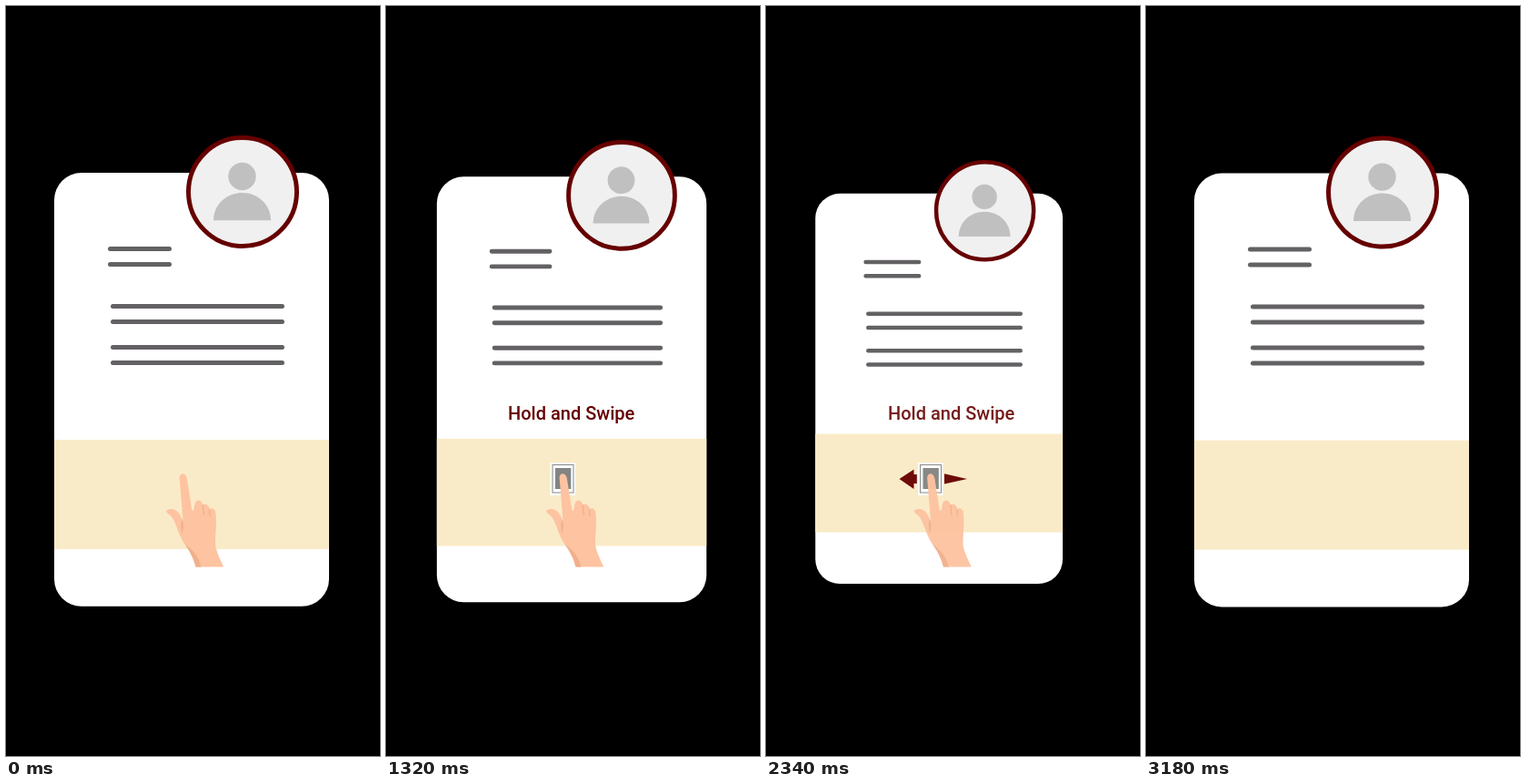
These frames come from a looping animation (411 px wide and 823 px high, 3.63 s). An HTML page:

```html
<!DOCTYPE html>
<html lang="en">
<head>
<meta charset="utf-8">
<title>Hold and swipe</title>
<style>
  html, body { margin: 0; width: 100%; height: 100%; overflow: hidden; background: #000; }
  svg { display: block; width: 100%; height: 100%; }
  text { font: 500 20px Roboto, sans-serif; fill: #660000; }
</style>
</head>
<body>
<svg viewBox="0 0 411 823">
  <defs>
    <g id="card">
      <rect x="53" y="183" width="302" height="475.8" rx="30" fill="#fff"/>
      <rect x="53" y="476" width="302" height="120" fill="#faebc8"/>
      <path d="M114.5 266.5h65M114.5 283.5h65M117.5 329.5h186M117.5 346.5h186M117.5 374.5h186M117.5 391.5h186"
            stroke="#636164" stroke-width="5" stroke-linecap="round"/>
      <circle cx="260" cy="204" r="59.5" fill="#f0f0f0" stroke="#660000" stroke-width="5"/>
      <g fill="#c0c0c0">
        <circle cx="259.5" cy="187" r="15.2"/>
        <path d="M228 235.3C228 218 242 205 259.5 205S291 218 291 235.3Z"/>
      </g>
    </g>
  </defs>

  <use id="current" href="#card"/>
  <use id="next" href="#card"/>
  <text id="label" x="134" y="453.6">Hold and Swipe</text>

  <g id="gesture">
    <path id="arrows" fill="#660000" d="M160 519L176 508.5V514H179.3V524H176V530ZM209.5 513.3L234.5 519L209.5 524.5Z"/>
    <g id="button">
      <rect x="180.5" y="501" width="27.5" height="36" fill="#fff"/>
      <rect x="183" y="503.5" width="23" height="30.5" fill="none" stroke="#858886"/>
      <rect x="186" y="507" width="17.3" height="23" fill="#828583"/>
    </g>
    <g id="hand">
      <path fill="#fec3a0" d="M190.7 519C190 511.5 197.5 511.5 198.8 518L204.3 553C206 555 206.5 553 207 549
        C208 540 215 541 216.5 548C218 545.5 223 546.5 224 552.5C226 550 230 551.5 230.3 556
        C232 566 230 577 230 590C230.5 597 234 604 239.2 615.5H208.5C206 605 201 597 196.5 590.5
        C190 582 188 570 182.5 561C180 558 176.5 557 176 554C180 551 186 551.5 189.5 556
        C192 559 193 562 194.5 565Z"/>
      <path fill="#f1b08c" d="M196.5 590.5C201 597 206 605 208.5 615.5H214.5C212 605 206 597 196.5 590.5Z
        M193.3 563C195.5 568 195.5 573 193.5 578.5C192 574 192 568 193.3 563Z"/>
      <path fill="none" stroke="#f1b08c" stroke-width="1.3" d="M216.5 547Q216.2 553 217.6 558.5M223.7 552Q223 556 224.4 560"/>
    </g>
  </g>
</svg>
<script>
const LOOP = 3630, STEP = 30, SWIPE = 2310, ARRIVE = 3180, SPEED = 0.4665;
const get = id => document.getElementById(id);
const ramp = (t, from, to) => Math.min(1, Math.max(0, (t - from) / (to - from)));
const opacity = (id, value) => get(id).setAttribute('opacity', value);
const transform = (id, value) => get(id).setAttribute('transform', value);

// Distance covered when speeding up evenly over `rise` ms, then steady.
const softStart = (t, speed, rise) =>
  t < rise ? speed * t * t / (2 * rise) : speed * (t - rise / 2);

// Steady for `hold` ms, then braking to a stop over `brake` ms.
function softStop(t, speed, hold, brake) {
  const u = Math.min(Math.max(t - hold, 0), brake);
  return speed * (Math.min(t, hold) + u - u * u / (2 * brake));
}

function draw(t) {
  const swiped = Math.max(0, t - SWIPE);
  const scale = 1 - softStart(Math.max(0, t - 780), 8e-5, 622);
  transform('current', `translate(${205.5 - SPEED * swiped} 411.5) scale(${scale}) translate(-205.5 -411.5)`);
  transform('next', `translate(${SPEED * (ARRIVE - Math.min(ARRIVE, Math.max(SWIPE, t)))} .6)`);
  transform('gesture', `translate(${-softStop(swiped, 0.45, 300, 360)} 0)`);

  const appear = ramp(t, 30, 600), leave = 1 - ramp(t, SWIPE, 2940);
  opacity('label', appear * (1 - ramp(t, SWIPE, 2580)));
  opacity('hand', leave);
  opacity('button', appear * leave);
  opacity('arrows', ramp(t, 1410, 2010) * leave);
}

const start = performance.now();
function tick() {
  const t = (performance.now() - start) % LOOP;
  draw(Math.floor(t / STEP) * STEP);
  requestAnimationFrame(tick);
}
tick();
</script>
</body>
</html>
```
